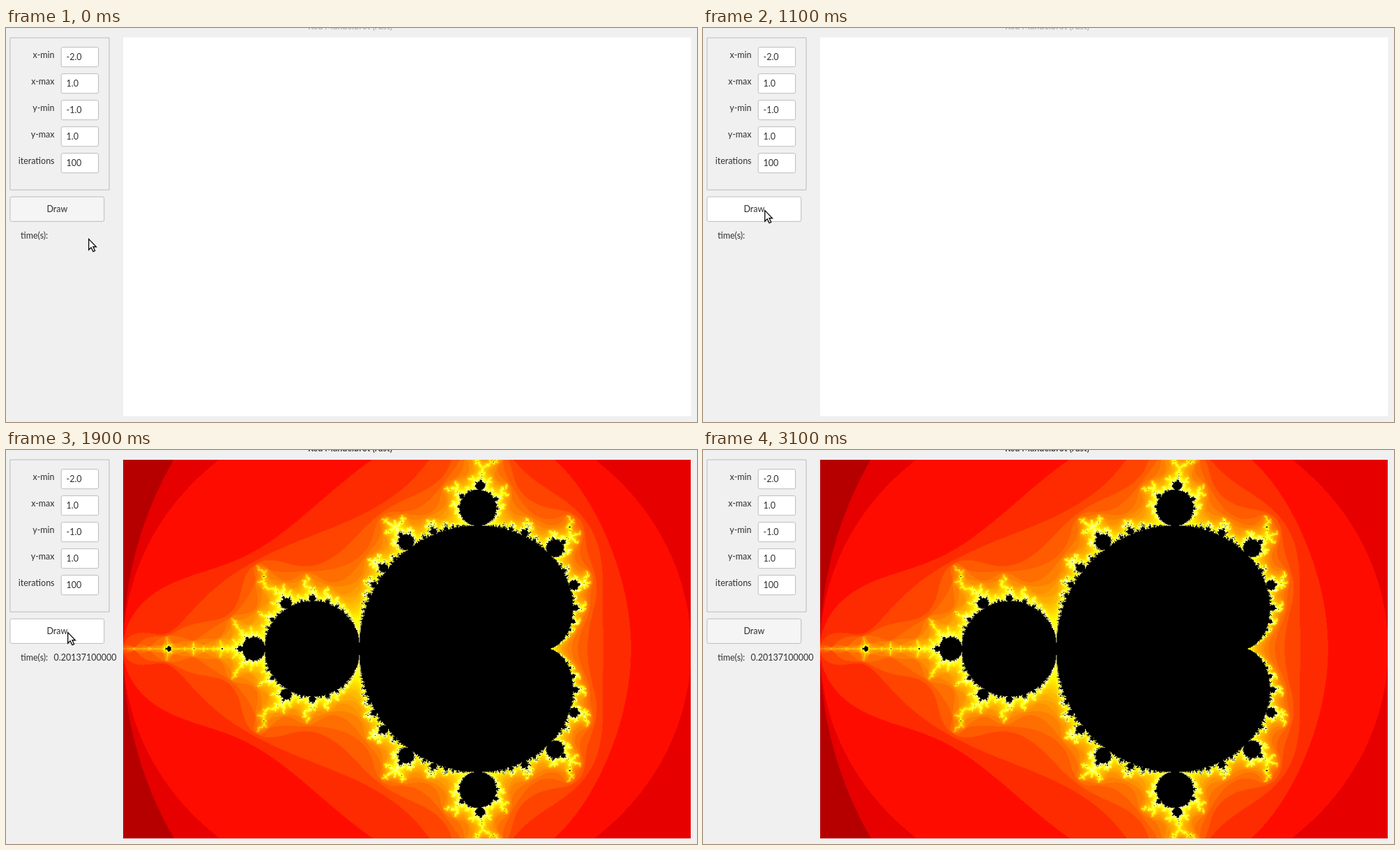
An HTML page with a canvas that plays this animation: 991x565 px, repeating every 3.7 s.

```html
<!DOCTYPE html>
<html lang="en">
<head>
<meta charset="utf-8">
<title>Mandelbrot</title>
<style>
  html, body { margin: 0; width: 100%; height: 100%; overflow: hidden; background: #f0f0f0; }
  canvas { display: block; }
</style>
</head>
<body>
<canvas id="stage" width="991" height="565"></canvas>
<script>
const ctx = document.getElementById('stage').getContext('2d');
const LOOP = 3700, STEP = 100;
const SCALE = 0.905; // the window is laid out in its own units, then shrunk
const VIEW = { x: 185.6, y: 15, w: 900, h: 600 };
const FIELDS = { 'x-min': '-2.0', 'x-max': '1.0', 'y-min': '-1.0', 'y-max': '1.0', iterations: '100' };
const INK = [48, 48, 48], WHITE = [255, 255, 255], RED = [192, 90, 87];

const START = [130.4, 333.7], ABOVE = [98.3, 254.2], PRESS = [97.3, 288.4], EXIT = [48.6, 7.7];

const clamp = v => Math.min(1, Math.max(0, v));
const mix = (a, b, k) => a.map((v, i) => v + (b[i] - v) * k);
const rgb = c => `rgb(${c.map(Math.round)})`;
const smooth = k => k * k * (3 - 2 * k);
const overshoot = k => 1 + 2.7 * (k - 1) ** 3 + 1.7 * (k - 1) ** 2;
const accelerate = k => k ** 4;

function escapeCount(cx, cy, limit) {
  let x = 0, y = 0, n = 2;
  while (n < limit && x * x + y * y <= 4) {
    [x, y] = [x * x - y * y + cx, 2 * x * y + cy];
    n++;
  }
  return n;
}

function renderFractal(limit) {
  const canvas = document.createElement('canvas');
  canvas.width = VIEW.w;
  canvas.height = VIEW.h;
  const c = canvas.getContext('2d');
  const image = c.createImageData(VIEW.w, VIEW.h);
  for (let py = 0, i = 0; py < VIEW.h; py++) {
    for (let px = 0; px < VIEW.w; px++, i += 4) {
      const n = escapeCount(-2 + 3 * (px + 0.5) / VIEW.w, -1 + 2 * (py + 0.5) / VIEW.h, limit);
      const heat = n < limit ? 765 * Math.log(n) / Math.log(limit - 1) : 0;
      for (let k = 0; k < 3; k++) image.data[i + k] = Math.floor(heat - 255 * k);
      image.data[i + 3] = 255;
    }
  }
  c.putImageData(image, 0, 0);
  return canvas;
}

function text(string, x, y, { align = 'left', color = rgb(INK), weight = 'normal' } = {}) {
  ctx.font = `${weight} 13.8px Lato, sans-serif`;
  ctx.textAlign = align;
  ctx.fillStyle = color;
  ctx.fillText(string, x, y);
}

function box(x, y, w, h, radius, fill) {
  ctx.beginPath();
  ctx.roundRect(x + 0.5, y + 0.5, w - 1, h - 1, radius);
  ctx.fillStyle = fill;
  ctx.fill();
  ctx.strokeStyle = '#b6b6b6';
  ctx.lineWidth = 1;
  ctx.stroke();
}

function pointerAt(t) {
  const glide = (from, to, start, end, ease) => mix(from, to, ease(clamp((t - start) / (end - start))));
  if (t <= 700) return glide(START, ABOVE, 100, 700, overshoot);
  if (t <= 1100) return glide(ABOVE, PRESS, 700, 1100, smooth);
  return glide(PRESS, EXIT, 2600, 3000, accelerate);
}

const arrow = new Path2D('M.7 .7V17.8L4.6 14.2L7.7 20.5L10.6 19.2L7.7 13H12.6Z');

function drawPointer([x, y]) {
  ctx.save();
  ctx.translate(x, y);
  ctx.fillStyle = '#fff';
  ctx.fill(arrow);
  ctx.strokeStyle = '#111';
  ctx.lineWidth = 1.5;
  ctx.stroke(arrow);
  ctx.restore();
}

function drawButton(t, [x, y]) {
  const [left, top, w, h] = [6, 267, 150, 40];
  const hover = x > left && x < left + w && y > top && y < top + h;
  const pressed = t < 1700 ? clamp((t - 1200) / 300) : clamp((1900 - t) / 600);
  const base = hover ? WHITE : [245, 245, 245];
  box(left, top, w, h, 2.5, rgb(mix(base, RED, pressed)));
  text('Draw', left + w / 2, 291.7, { align: 'center', color: rgb(mix(INK, WHITE, pressed)) });
}

const fractal = renderFractal(Number(FIELDS.iterations));

function draw(t) {
  const pointer = pointerAt(t);
  ctx.setTransform(SCALE, 0, 0, SCALE, 0, 0);
  ctx.imageSmoothingQuality = 'high';
  ctx.fillStyle = '#f0f0f0';
  ctx.fillRect(0, 0, 1100, 630);
  text('Red Mandelbrot (rust)', 545.3, 1.7, {
    align: 'center', color: t < 1300 ? '#b4b4b4' : '#404040', weight: 'bold'
  });

  box(6, 15, 158, 242, 0, '#f0f0f0');
  Object.entries(FIELDS).forEach(([label, value], i) => {
    const top = 30 + 42 * i;
    text(label, 76.8, top + 17.5, { align: 'right' });
    box(87, top, 60, 32, 2.5, '#fff');
    text(value, 95.6, top + 20.3);
  });
  drawButton(t, pointer);
  text('time(s):', 23.2, 333.7);

  if (t < 1700) {
    ctx.fillStyle = '#fff';
    ctx.fillRect(VIEW.x, VIEW.y, VIEW.w, VIEW.h);
  } else {
    ctx.drawImage(fractal, VIEW.x, VIEW.y, VIEW.w, VIEW.h);
    text('0.20137100000', 75.8, 333.7);
  }
  if (t < 3100) drawPointer(pointer);
}

function tick() {
  draw(Math.floor(performance.now() % LOOP / STEP) * STEP);
  requestAnimationFrame(tick);
}
tick();
</script>
</body>
</html>
```
